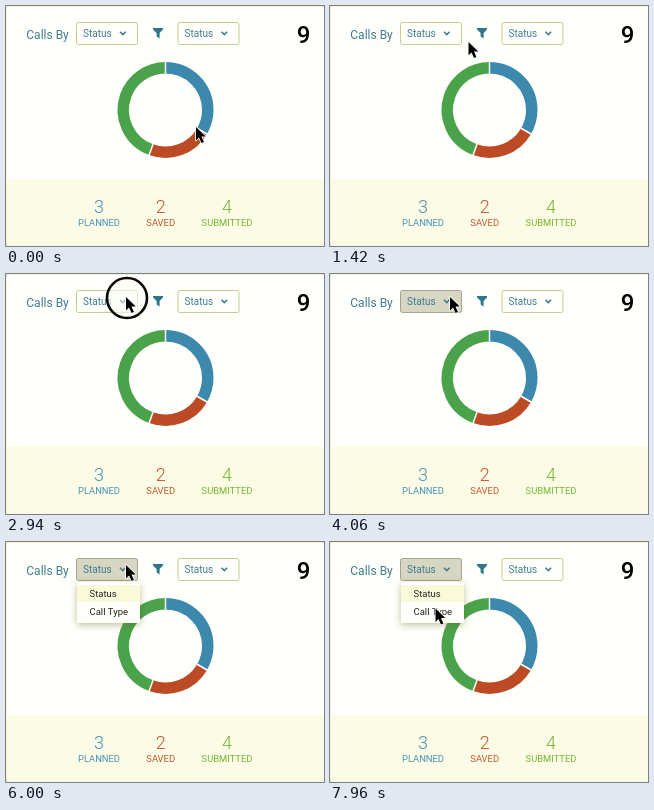
An HTML page with a canvas for the animation above (8000 ms loop, 318x240 px).

```html
<!DOCTYPE html>
<html lang="en">
<head>
<meta charset="utf-8">
<title>Calls by status</title>
<style>
  html, body { margin: 0; width: 100%; height: 100%; overflow: hidden; background: #fffffb; }
  canvas { display: block; width: 318px; height: 240px; }
</style>
</head>
<body>
<canvas id="stage" width="318" height="240"></canvas>
<script>
const ctx = document.getElementById('stage').getContext('2d');
const LOOP = 8000, TAU = Math.PI * 2;
const PAPER = '#fffffb', TEAL = '#3f7c8f';
const BLUE = '#3d88ad', RED = '#bc4a25', GREEN = '#4aa24b';

// The pointer glides between rest points along bowed curves.
const START = { x: 190, y: 121 };
const glides = [
  { from: 20, to: 1520, bend: { x: 204, y: 89 }, end: { x: 129, y: 28 } },
  { from: 1640, to: 1940, bend: { x: 124, y: 26 }, end: { x: 120, y: 23 } },
  { from: 6300, to: 7120, bend: { x: 106, y: 56 }, end: { x: 113, y: 35 } },
  { from: 7120, to: 7960, bend: { x: 94, y: 95 }, end: { x: 105.5, y: 66.5 } }
];

const ramp = (t, a, b) => Math.max(0, Math.min(1, (t - a) / (b - a)));
const bezier = (a, b, c, k) => (1 - k) ** 2 * a + 2 * k * (1 - k) * b + k * k * c;

function pointerAt(t) {
  let at = START;
  for (const { from, to, bend, end } of glides) {
    const k = ramp(t, from, to);
    at = { x: bezier(at.x, bend.x, end.x, k), y: bezier(at.y, bend.y, end.y, k) };
    if (k < 1) break;
  }
  return at;
}

function text(str, x, y, size, color, weight = 400, align = 'left') {
  ctx.font = `${weight} ${size}px Roboto, sans-serif`;
  ctx.textAlign = align;
  ctx.fillStyle = color;
  ctx.fillText(str, x, y);
}

function stroke(path, color, width) {
  ctx.strokeStyle = color;
  ctx.lineWidth = width;
  ctx.stroke(path);
}

function fill(path, color) {
  ctx.fillStyle = color;
  ctx.fill(path);
}

function select(x, pressed) {
  const box = new Path2D();
  box.roundRect(x + 0.5, 16.5, 61, 22, 2);
  fill(box, pressed ? '#d6d6c2' : PAPER);
  stroke(box, pressed ? '#a5a58e' : '#cbcb90', 1);
  text('Status', x + 7, 31, 10, TEAL);
  stroke(new Path2D(`M${x + 44} 25.7l2.8 2.8l2.8-2.8`), TEAL, 1.6);
}

function donut(cx, cy, inner, outer) {
  const parts = [[3, BLUE], [2, RED], [4, GREEN]];
  const turn = n => n / 9 * TAU - TAU / 4;
  let done = 0;
  for (const [count, color] of parts) {
    const ring = new Path2D();
    ring.arc(cx, cy, (inner + outer) / 2, turn(done), turn(done + count));
    stroke(ring, color, outer - inner);
    done += count;
  }
  done = 0;
  for (const [count] of parts) {
    const c = Math.cos(turn(done)), s = Math.sin(turn(done));
    const gap = new Path2D();
    gap.moveTo(cx + c * inner, cy + s * inner);
    gap.lineTo(cx + c * (outer + 1), cy + s * (outer + 1));
    stroke(gap, PAPER, 1.5);
    done += count;
  }
}

function stat(value, label, x, color) {
  text(value, x, 207.3, 18, color, 300, 'center');
  text(label, x, 219.6, 9.4, color, 400, 'center');
}

function menu(alpha) {
  if (!alpha) return;
  ctx.save();
  ctx.globalAlpha = alpha;
  ctx.shadowColor = 'rgba(100,100,20,.4)';
  ctx.shadowBlur = 7;
  ctx.shadowOffsetY = 2;
  ctx.fillStyle = PAPER;
  ctx.fillRect(71, 40, 63, 41);
  ctx.shadowColor = 'transparent';
  ctx.fillStyle = '#fafadb';
  ctx.fillRect(71, 43, 63, 17);
  ['Status', 'Call Type'].forEach((item, i) => text(item, 83.5, 55 + i * 17.7, 9.5, '#222'));
  ctx.restore();
}

function clickRing(t, start, end) {
  if (t < start || t >= end) return;
  const ring = new Path2D();
  ring.arc(121, 24, 9 + 11 * ramp(t, start, start + 140), 0, TAU);
  fill(ring, 'rgba(255,255,250,.55)');
  stroke(ring, '#080808', 2.6);
}

const arrow = new Path2D('M0 0V13.4L3 10.5L5.5 16L7.9 15L5.5 9.6H9.8Z');
const funnel = new Path2D('M147 22H157V23.5L153.6 27V32.5L150.6 30.5V27L147 23.5Z');

function pointer({ x, y }) {
  ctx.save();
  ctx.translate(x, y);
  ctx.lineJoin = 'round';
  stroke(arrow, '#fff', 1.6);
  fill(arrow, '#000');
  ctx.restore();
}

function draw(t) {
  ctx.fillStyle = PAPER;
  ctx.fillRect(0, 0, 318, 240);
  ctx.fillStyle = '#fcfce6';
  ctx.fillRect(0, 173, 318, 67);
  ctx.fillStyle = '#f6f6c4';
  ctx.fillRect(0, 0, 318, 1);
  ctx.fillRect(0, 0, 1, 240);

  text('Calls By', 20.3, 32.5, 12, TEAL);
  select(70, t >= 3240);
  select(171.5, false);
  fill(funnel, '#2d7789');
  text('9', 304.5, 36.8, 24, '#000', 500, 'right');
  donut(159.5, 104, 36.5, 48);
  stat('3', 'PLANNED', 93, '#4591b8');
  stat('2', 'SAVED', 154.7, '#c2552b');
  stat('4', 'SUBMITTED', 221, '#75b532');

  menu(ramp(t, 5860, 5980));
  clickRing(t, 2680, 3060);
  clickRing(t, 5460, 5720);
  pointer(pointerAt(t));
}

const begin = performance.now();
function frame() {
  draw((performance.now() - begin) % LOOP);
  requestAnimationFrame(frame);
}
frame();
</script>
</body>
</html>
```
